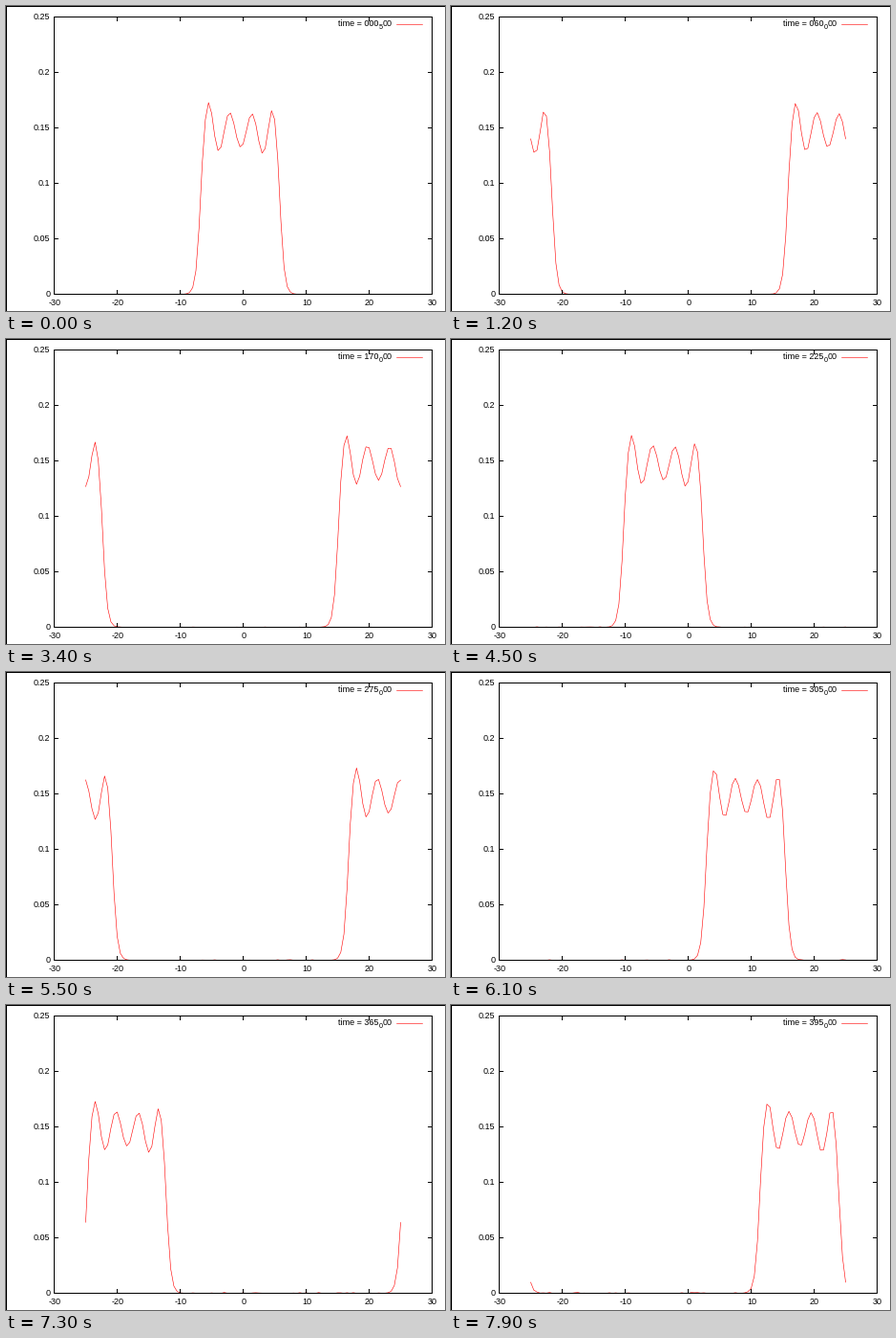
These frames come from a looping animation (460x319 px, 8 s). A matplotlib script:

```python
import numpy as np
import matplotlib.pyplot as plt
from matplotlib.animation import FuncAnimation

W, H, DPI = 460, 319, 64
PX = 72 / DPI                       # one pixel in points
LEFT, RIGHT, TOP, BOTTOM = 50, 446, 11, 301
FRAMES, STEP_MS = 80, 100

plt.rcParams["font.family"] = "Liberation Sans"
fig = plt.figure(figsize=(W / DPI, H / DPI), dpi=DPI, facecolor="white")
ax = fig.add_axes([0, 0, 1, 1])
ax.set_xlim(0, W)
ax.set_ylim(H, 0)
ax.axis("off")


def px(x):
    return LEFT + (x + 30) / 60 * (RIGHT - LEFT)


def py(y):
    return BOTTOM - y / 0.25 * (BOTTOM - TOP)


def line(xs, ys):
    # Whole coordinates are snapped to the middle of their pixel
    ax.plot(xs, ys, color="black", lw=PX, zorder=5, antialiased=False,
            solid_capstyle="projecting", solid_joinstyle="miter")


def label(x, y, s, ha="left", size=9):
    return ax.text(x, y, s, ha=ha, va="baseline", fontsize=size * PX, zorder=6)


# Picture edge, plot border, ticks and tick labels
line([0, 0], [0, H])
line([0, W], [0, 0])
line([LEFT, RIGHT, RIGHT, LEFT, LEFT], [TOP, TOP, BOTTOM, BOTTOM, TOP])
for v in range(-30, 31, 10):
    x = round(px(v))
    line([x, x], [BOTTOM, BOTTOM - 4])
    line([x, x], [TOP, TOP + 4])
    label(x + 1, 313, str(v), "center")
for k in range(6):
    y = round(py(k * 0.05))
    line([LEFT, LEFT + 4], [y, y])
    line([RIGHT, RIGHT - 4], [y, y])
    label(46.6, y + 3.4, f"{k * 0.05:.2g}", "right")

# Legend: the first decimal is set as a subscript
whole = label(348.3, 21, "")
tenth = label(390.8, 24, "", size=7.2)
label(394.8, 21, "00")

THIN = dict(color="#ff0000", lw=0.58 * PX, zorder=3)
ax.plot([409, 436], [19, 19], **THIN)
curve, = ax.plot([], [], solid_joinstyle="round", **THIN)

SPAN = 50                           # length of the periodic domain
GRID = np.linspace(-SPAN / 2, SPAN / 2, 101)
SPEED, START = -0.461, -0.01
WAVE = 3.45                         # distance between crests
EDGE, STEEP = 6.27, 2.65


def density(t):
    """Four-crested packet with soft walls, drifting left and wrapping."""
    u = (GRID - START - SPEED * t + 0.23 + SPAN / 2) % SPAN - SPAN / 2
    s = np.clip(u - 0.1, -1.5 * WAVE, 1.5 * WAVE)
    swing = 0.0145 + 0.0005 * s**2
    ripple = (0.147 + 0.00012 * s**2 - 0.0003 * s
              - swing * np.cos(2 * np.pi * s / WAVE))
    wall = 1 / (1 + np.exp(STEEP * (np.abs(u) - EDGE)))
    noise = np.random.default_rng(int(t)).random(GRID.size) ** 5
    return ripple * wall + 0.0008 * t / 400 * noise


def draw(n):
    t = 5 * n if n else 0.5
    curve.set_data(px(GRID) + 0.5, py(density(t)) + 0.5)
    whole.set_text(f"time = {int(t):03d}")
    tenth.set_text(str(int(t * 10) % 10))
    return curve, whole, tenth


anim = FuncAnimation(fig, draw, frames=FRAMES, interval=STEP_MS,
                     repeat=True, repeat_delay=0)
plt.show()
```
